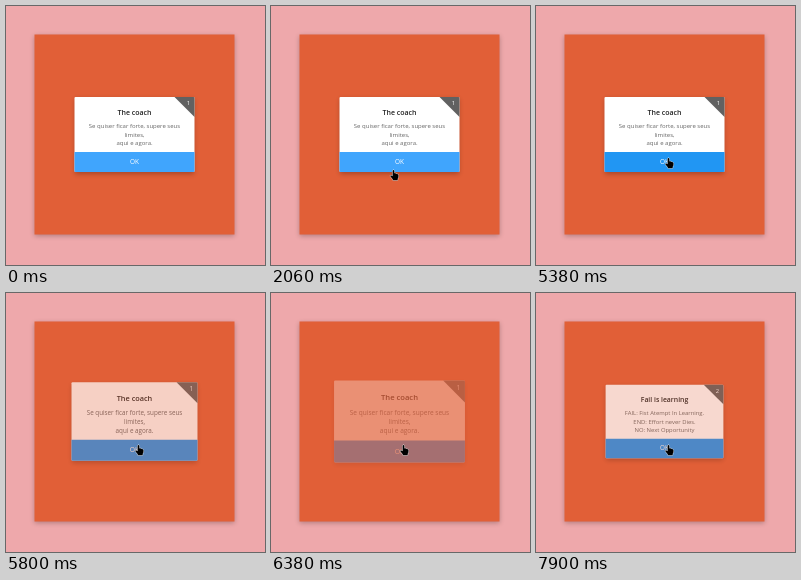
Recreate the animation shown at these times as an HTML page. Size 259 by 259 pixels, loop 8 s.

```html
<!DOCTYPE html>
<html lang="en">
<head>
<meta charset="utf-8">
<title>Coach card</title>
<style>
  html, body { margin: 0; width: 100%; height: 100%; overflow: hidden; background: #eea8ab; }
  svg { display: block; width: 100vw; height: 100vh; }
  text { font-family: "Open Sans", "Noto Sans", sans-serif; font-size: 6px; text-anchor: middle; }
  .title { font-size: 7px; font-weight: 600; fill: #212121; }
  .body { fill: #666; }
  .light { fill: #fff; }
  .cursor { fill: #000; stroke: #fff; stroke-width: .8; stroke-linejoin: round; paint-order: stroke; }
</style>
</head>
<body>
<svg viewBox="0 0 259 259" xmlns="http://www.w3.org/2000/svg">
  <defs>
    <filter id="soft" x="-20%" y="-20%" width="140%" height="140%">
      <feGaussianBlur stdDeviation="2.5"/>
    </filter>
  </defs>
  <rect width="259" height="259" fill="#eea8ab"/>
  <rect x="28.5" y="30" width="200" height="200" fill="#000" opacity=".25" filter="url(#soft)"/>
  <rect x="28.5" y="28.5" width="200" height="200" fill="#e15f37"/>
  <g id="card">
    <rect x="69" y="93" width="119" height="75" fill="#000" opacity=".26" filter="url(#soft)"/>
    <rect x="68.5" y="91" width="120" height="75" rx="1" fill="#fff"/>
    <path d="M168.5 91H187.5Q188.5 91 188.5 92V111Z" fill="#616161"/>
    <path id="button" d="M68.5 146H188.5V165Q188.5 166 187.5 166H69.5Q68.5 166 68.5 165Z"/>
    <text id="number" class="light" x="182.5" y="99.2"></text>
    <text id="title" class="title" x="128.5" y="108.6"></text>
    <text class="body line" x="128.5" y="122.4"></text>
    <text class="body line" x="128.5" y="130.8"></text>
    <text class="body line" x="128.5" y="139.1"></text>
    <text class="light" x="128.5" y="158" style="font-size:6.4px">OK</text>
  </g>
  <path id="arrow" class="cursor" d="M.4 .6V8.2L2.1 6.6L3.3 9.2L4.6 8.6L3.4 6.1H5.7Z"/>
  <path id="hand" class="cursor" d="M-.9 .5Q0 -.6 .9 .5V3.4L1.9 3.3L2.5 3.8L3.4 3.7L4 4.3Q5 4.2 5 5.3V7.2L4.2 8.8V10.2H-.7V9.3L-3 6.6Q-3.6 5.4 -2.5 5.2L-.9 6.2Z"/>
</svg>
<script>
const LOOP = 8000;
const LEAVE = 5380, ENTER = 7080, ZOOM = 1440, FADE_IN = 1080;
const cards = [
  { title: "The coach", lines: ["Se quiser ficar forte, supere seus", "limites,", "aqui e agora."] },
  { title: "Fail is learning", lines: ["FAIL: Fist Atempt In Learning.", "END: Effort never Dies.", "NO: Next Opportunity"] }
];
// start, end, from, to
const moves = [
  [450, 1220, [65, -9], [97, 66]],
  [1290, 2070, [97, 66], [122.5, 164]],
  [3420, 4010, [122.5, 164], [132.5, 152]]
];

const $ = id => document.getElementById(id);
const card = $("card"), button = $("button"), arrow = $("arrow"), hand = $("hand");
const lines = document.querySelectorAll(".line");

const clamp = v => Math.min(1, Math.max(0, v));
const span = (t, a, b) => clamp((t - a) / (b - a));
const mix = (a, b, p) => a + (b - a) * p;
const easeOut = p => 1 - (1 - p) ** 2;
const easeInOut = p => (1 - Math.cos(Math.PI * p)) / 2;

let shown = -1;
function fill(i) {
  if (i === shown) return;
  shown = i;
  $("number").textContent = i + 1;
  $("title").textContent = cards[i].title;
  lines.forEach((el, k) => el.textContent = cards[i].lines[k]);
}

function drawCard(t) {
  const entering = t >= ENTER;
  fill(entering ? 1 : 0);
  const p = easeOut(entering ? span(t, ENTER, ENTER + ZOOM) : span(t, LEAVE, LEAVE + ZOOM));
  const scale = entering ? mix(.9, 1, p) : mix(1, 1.1, p);
  const alpha = entering ? span(t, ENTER, ENTER + FADE_IN) : 1 - span(t, LEAVE, LEAVE + ZOOM);
  card.setAttribute("transform", `translate(128.5 128.5) scale(${scale}) translate(-128.5 -128.5)`);
  card.setAttribute("opacity", alpha);
  const hover = span(t, 2100, 2760);
  const rgb = [[64, 165, 253], [33, 150, 243]];
  button.setAttribute("fill", `rgb(${rgb[0].map((v, i) => mix(v, rgb[1][i], hover))})`);
}

function drawCursor(t) {
  let pos = moves[0][2];
  for (const [start, end, from, to] of moves) {
    if (t < start) break;
    const p = easeInOut(span(t, start, end));
    pos = from.map((v, i) => mix(v, to[i], p));
  }
  const over = pos[1] > 146;
  arrow.setAttribute("visibility", !over && t >= 500 ? "visible" : "hidden");
  hand.setAttribute("visibility", over ? "visible" : "hidden");
  (over ? hand : arrow).setAttribute("transform", `translate(${pos})`);
}

const began = performance.now();
function frame() {
  const t = (performance.now() - began) % LOOP;
  drawCard(t);
  drawCursor(t);
  requestAnimationFrame(frame);
}
frame();
</script>
</body>
</html>
```
